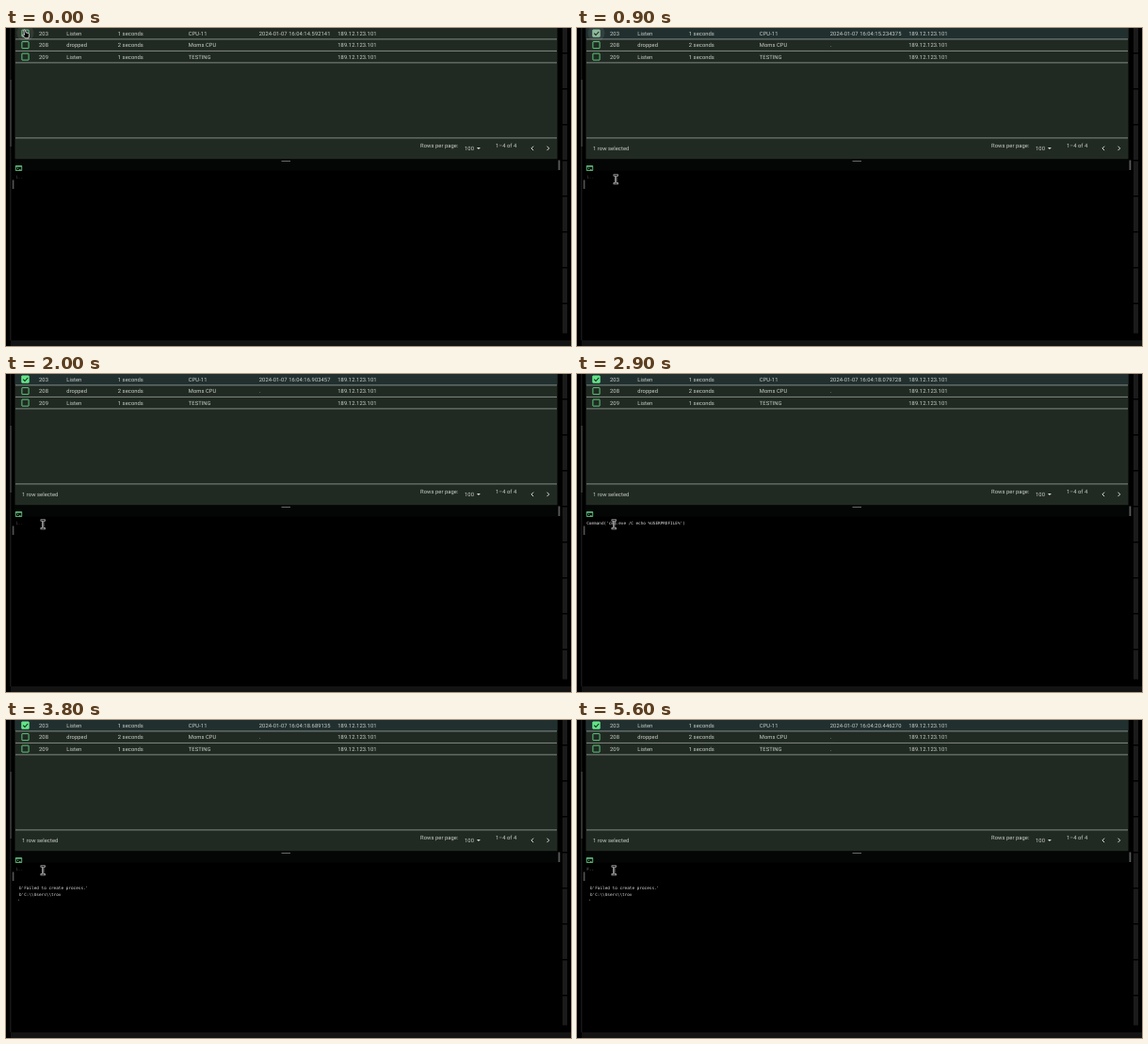
An HTML page for the animation above (5700 ms loop, 600 by 338 pixels).

```html
<!DOCTYPE html>
<html lang="en">
<head>
<meta charset="utf-8">
<style>
  html, body { margin: 0; width: 100%; height: 100%; overflow: hidden; background: #000; }
  svg { display: block; width: 600px; height: 338px; }
  text {
    font: 5.8px Roboto, sans-serif; letter-spacing: .06px; fill: #c9cecb;
    white-space: pre; text-rendering: geometricPrecision;
  }
  .mono text { font: 4.35px "DejaVu Sans Mono", monospace; letter-spacing: 0; fill: #e0e0e0; }
  .icon { fill: none; stroke: #d5dad7; stroke-width: 1; }
  .pointer { fill: #000; stroke: #e4e4e4; stroke-width: .9; stroke-linejoin: round; }
</style>
</head>
<body>
<svg id="stage" viewBox="0 0 600 338">
  <rect width="600" height="338"/>
  <rect x="4" width="1.5" height="332" fill="#171717"/>
  <rect x="4" y="55" width="2" height="71" fill="#303331"/>
  <g id="rail" fill="#1b1b1b"></g>
  <rect x="5" y="332" width="595" height="6" fill="#131313"/>

  <rect x="9.5" width="576" height="139.3" fill="#212a22"/>
  <rect id="selectedRow" x="9.5" width="576" height="11.8" fill="#21302f"/>
  <path d="M10 11.9H585M10 24.4H585M10 36.9H585M10 116.9H585" stroke="#9ba29d" stroke-width=".8"/>
  <g id="table"></g>
  <circle id="ripple" cx="20.5" cy="5.5" r="9" fill="#fff" opacity=".08"/>
  <g id="check">
    <rect x="16.5" y="1.8" width="8" height="7.8" rx=".6"/>
    <path d="M18.2 5.7L20 7.5L23.2 4" fill="none" stroke="#18251c" stroke-width="1.1"/>
  </g>
  <text id="count" x="17" y="130">1 row selected</text>
  <text x="440" y="127">Rows per page:</text>
  <text x="487" y="130">100</text>
  <text x="520" y="127">1–4 of 4</text>
  <path d="M499.9 127.1H503.9L501.9 129.1Z" fill="#d5dad7"/>
  <path class="icon" d="M560.1 125.7L557.9 127.9L560.1 130.1M574.5 125.7L576.7 127.9L574.5 130.1"/>

  <rect x="9" y="140" width="577" height="11.5" fill="#040605"/>
  <rect x="292.5" y="141" width="9.5" height="1" fill="#666b68"/>
  <rect x="586.5" y="140.5" width="1.8" height="10.5" fill="#5a5d5b"/>
  <rect x="6.8" y="161.5" width="1.6" height="9.5" fill="#555"/>
  <path d="M10.3 146.5H16.7V151.5H10.3ZM10.3 147.3H16.7M11.8 148.4L12.8 149.3L11.8 150.3M13.8 150.4H15.6"
    fill="none" stroke="#6fd58d" stroke-width=".8"/>

  <g class="mono">
    <text id="prompt" x="10.2" y="159.7"></text>
    <text id="command" x="10.2" y="159.7">Command('cmd.exe /C echo %USERPROFILE%')</text>
    <g id="output">
      <text x="14" y="179.7">b'Failed to create process.'</text>
      <text x="14" y="187.3">b'C:\\Users\\trov</text>
      <text x="12" y="194.3">'</text>
    </g>
  </g>

  <path id="hand" class="pointer" d="M18.8 2.3Q19.6 1.5 20.4 2.4L21.3 5L23.7 5.4Q24.7 6 24.6 7.5L24 10.8H20.4L17.6 7.8Q17.5 6.7 18.7 7L19.5 7.4Z"/>
  <path id="arrow" class="pointer" d="M0 0L6 5.2L3.1 6L.7 9Z"/>
  <g id="beam" fill="none">
    <path d="M-2.6 -4.4H2.6M0 -4.4V4.4M-2.6 4.4H2.6" stroke="#d8d8d8" stroke-width="2.1"/>
    <path d="M-2 -4.4H2M0 -4.4V4.4M-2 4.4H2" stroke="#000" stroke-width=".7"/>
  </g>
</svg>
<script>
const LOOP = 5700, STEP = 100;
const el = id => document.getElementById(id);
const show = (id, on) => el(id).style.display = on ? '' : 'none';
const move = (id, x, y) => el(id).setAttribute('transform', `translate(${x} ${y})`);

// [start time, seconds field of the last check-in]
const checkIns = [
  [0, '14.592141'], [500, '15.234375'], [1000, '15.775218'], [1500, '16.316122'],
  [1900, '16.903457'], [2400, '17.491630'], [2900, '18.079728'], [3800, '18.689135'],
  [4300, '19.274806'], [4700, '19.860319'], [5300, '20.446270']
];

const rows = [
  ['203', 'Listen', '1 seconds', 'CPU-11'],
  ['208', 'dropped', '2 seconds', 'Moms CPU'],
  ['209', 'Listen', '1 seconds', 'TESTING']
];
const columns = [35, 64.3, 118.8, 193.8];

el('table').innerHTML = rows.map((cells, r) => {
  const y = 7.6 + r * 12.5;
  const texts = cells.map((cell, c) => `<text x="${columns[c]}" y="${y}">${cell}</text>`).join('');
  return `<rect x="16.9" y="${y - 5.5}" width="7.2" height="7" rx=".3" fill="none" stroke="#62dc88" stroke-width=".9"/>${texts}
    <text id="seen${r}" x="268.8" y="${y}"></text><text x="352.3" y="${y}">189.12.123.101</text>`;
}).join('');

for (let y = -11; y < 325; y += 38) {
  el('rail').innerHTML += `<rect x="591" y="${y + 0.5}" width="5" height="${Math.min(36.5, 324 - y)}"/>`;
}

function draw(t) {
  const selected = t >= 900;
  const fading = selected && t < 1100;
  show('selectedRow', selected);
  show('check', selected);
  show('count', selected);
  show('ripple', t < 500 || fading);
  el('check').setAttribute('fill', fading ? '#91b89d' : '#62e588');

  el('seen0').textContent = '2024-01-07 16:04:' + checkIns.findLast(([start]) => t >= start)[1];
  el('seen1').textContent = t >= 500 ? '.' : '';
  el('seen2').textContent = t >= 5300 ? '.' : '';

  const sent = t >= 2900 && t < 3300;
  const lit = t >= 1500 && t < 2000 || t >= 4300 && t < 4900 || t >= 5600;
  show('command', sent);
  show('prompt', !sent);
  el('prompt').textContent = lit ? 'F..' : '1..';
  el('prompt').style.fill = lit ? '#808080' : '#484848';
  show('output', t >= 3500);

  show('hand', t < 500);
  show('arrow', t >= 500 && t < 900);
  show('beam', selected);
  const p = Math.min(1, Math.max(0, (t - 400) / 400));
  const ease = p * p * (3 - 2 * p);
  move('arrow', 20 + 23.9 * ease, 3 + 154.2 * ease);
  const settle = Math.max(0, 1 - (t - 900) / 200);
  move('beam', 39.2 + 2 * settle, 159.9 + settle);
}

const origin = performance.now();
function tick() {
  const t = (performance.now() - origin) % LOOP;
  draw(Math.floor(t / STEP) * STEP);
  requestAnimationFrame(tick);
}
tick();
</script>
</body>
</html>
```
